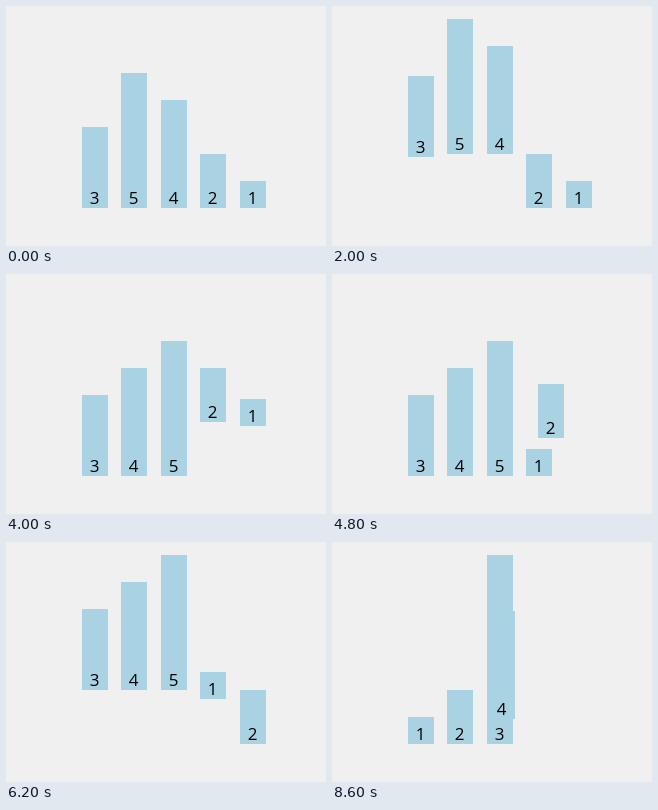
Animation, 320 px wide and 240 px high, one loop 8.8 s. Source, as an HTML page with a canvas:

```html
<!DOCTYPE html>
<html>
<head>
<meta charset="utf-8">
<title>Merge sort</title>
<style>
html, body { margin: 0; width: 100%; height: 100%; overflow: hidden; background: #f0f0f0; }
canvas { display: block; }
</style>
</head>
<body>
<canvas id="stage" width="320" height="240"></canvas>
<script>
const LOOP = 8800, TICK = 200, START = 500;
const BASE = 202, LIFT = 54, UNIT = 27, BAR = 26, LEFT = 76, STEP = 39.4;
const values = [3, 5, 4, 2, 1];

// Each merge lifts a range bar by bar, then drops the bars in sorted order.
const merges = [
  { from: 0, to: 2, lift: 212, drops: [212, 212] },
  { from: 0, to: 3, lift: 212, drops: [306, 650, 580] },
  { from: 3, to: 5, lift: 250, drops: [600, 600] },
  { from: 0, to: 5, lift: 256, drops: [580, 600, 600, 600, 600] }
];

function buildMoves() {
  const moves = [], order = [...values];
  let time = START;
  const add = (value, slot, up, length) => {
    moves.push({ value, slot, up, time, length });
    time += length;
  };
  for (const { from, to, lift, drops } of merges) {
    const part = order.slice(from, to);
    part.forEach((v, i) => add(v, from + i, 1, lift));
    part.sort((a, b) => a - b);
    part.forEach((v, i) => add(v, from + i, 0, drops[i]));
    order.splice(from, part.length, ...part);
  }
  return moves;
}

const moves = buildMoves();
const ctx = document.getElementById("stage").getContext("2d");
ctx.font = '17px "Open Sans", "Noto Sans", sans-serif';
ctx.textAlign = "center";

function pose(value, index, t) {
  let slot = index, up = 0;
  for (const m of moves) {
    if (m.value !== value || m.time >= t) continue;
    const p = Math.min(1, (t - m.time) / m.length);
    slot += (m.slot - slot) * p;
    up += (m.up - up) * p;
  }
  return { x: Math.round(LEFT + STEP * slot), y: Math.round(BASE - LIFT * up) };
}

function draw(t) {
  ctx.fillStyle = "#f0f0f0";
  ctx.fillRect(0, 0, 320, 240);
  values.forEach((value, i) => {
    const { x, y } = pose(value, i, t);
    ctx.fillStyle = "#a9d2e3";
    ctx.fillRect(x, y - value * UNIT, BAR, value * UNIT);
    ctx.fillStyle = "#000";
    ctx.fillText(value, x + 12.5, y - 4);
  });
}

const origin = performance.now();
function frame() {
  const t = (performance.now() - origin) % LOOP;
  draw(Math.floor(t / TICK) * TICK);
  requestAnimationFrame(frame);
}
frame();
</script>
</body>
</html>
```
